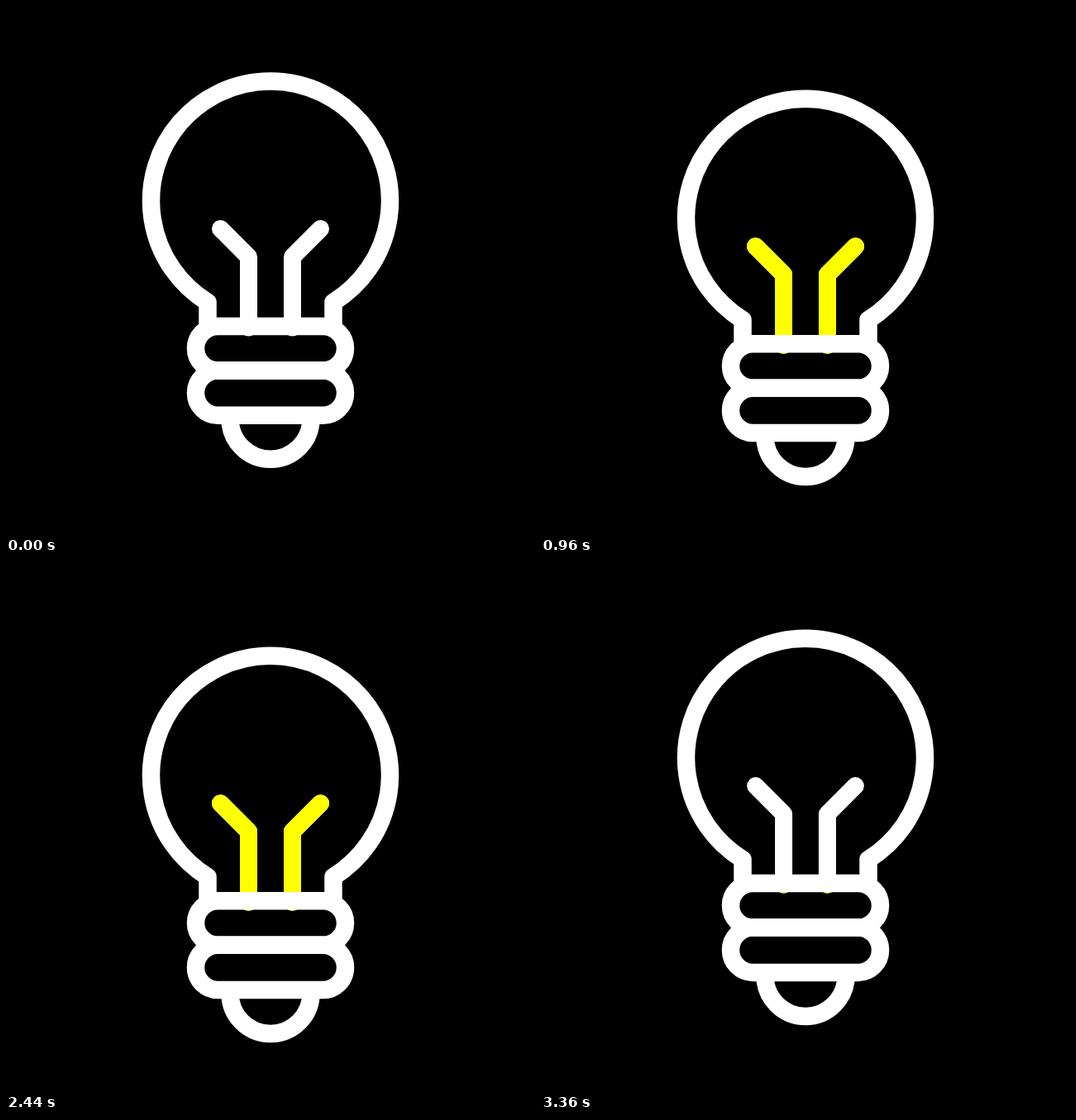
Recreate the animation shown at these times as an HTML page. Size 640 px wide and 640 px high, loop 3400 ms.

```html
<!DOCTYPE html>
<html lang="en">
<head>
<meta charset="utf-8">
<title>Light bulb</title>
<style>
  html, body { margin: 0; width: 100%; height: 100%; overflow: hidden; background: #000; }
  svg { display: block; width: 100%; height: 100%; }
  g { fill: none; stroke: #fff; stroke-linecap: round; stroke-linejoin: round; }
  #bulb { stroke-width: 21.5; }
  .wire { stroke-width: 21; }
  .ray { stroke-width: 20.5; }
  .lit { stroke: #ff0; }
</style>
</head>
<body>
<svg viewBox="0 0 640 640">
  <g id="bulb">
    <g id="wires" class="wire"></g>
    <g id="glow" class="wire lit"></g>
    <path d="M244 388V358.5A144.5 144.5 0 1 1 396 358.5V388"/>
    <rect x="229.5" y="387.5" width="181" height="53.5" rx="26.7"/>
    <rect x="229.5" y="441" width="181" height="54.3" rx="27"/>
    <path d="M271 497V499.3A49 49 0 0 0 369 499.3V497"/>
    <g id="rays" class="ray"></g>
    <g id="litRays" class="ray lit"></g>
  </g>
</svg>
<script>
const STEP = 40, COUNT = 85;
const el = id => document.getElementById(id);

// Eased value at time t from [time, value] keys.
function track(keys, t) {
  if (t <= keys[0][0]) return keys[0][1];
  for (let i = 1; i < keys.length; i++) {
    const [a, from] = keys[i - 1], [b, to] = keys[i];
    if (t <= b) {
      const u = (t - a) / (b - a);
      return from + (to - from) * u * u * (3 - 2 * u);
    }
  }
  return keys[keys.length - 1][1];
}

const BOB = [[30, 0], [280, 22], [650, 0], [920, 22], [1280, 0]];
const PINCH = [[30, 0], [320, 1], [640, 0]];
const GLOW = [[30, 0], [480, 1], [1200, 1], [1680, 0]];
const RAY_END = [[120, 0], [520, 1]];
const RAY_START = [[600, 0], [920, 1]];
const RAY_LIT = [[360, 0], [600, 1]];

// Inner point of each left ray and its direction outwards.
const RAYS = [[131, 152.3, -.907, -.42], [120.5, 212, -1, 0], [131, 271.7, -.907, .42]];
const RAY_LENGTH = 28.5;

const add = (parent, d) => {
  const p = document.createElementNS('http://www.w3.org/2000/svg', 'path');
  if (d) p.setAttribute('d', d);
  return parent.appendChild(p);
};
const mirror = (x, side) => side ? 640 - x : x;

const wires = [0, 1].map(side => ({ side, base: add(el('wires')), lit: add(el('glow')) }));
wires.forEach(w => w.lit.setAttribute('pathLength', 100));

const rays = [0, 1].flatMap(side => RAYS.map(ray => (
  { side, ray, base: add(el('rays')), lit: add(el('litRays')) })));

function segment(path, { side, ray: [x, y, dx, dy] }, from, to) {
  const at = k => `${mirror(x + dx * RAY_LENGTH * k, side)} ${y + dy * RAY_LENGTH * k}`;
  path.setAttribute('d', to > from ? `M${at(from)}L${at(to)}` : '');
}

function draw(t) {
  el('bulb').setAttribute('transform', `translate(0 ${track(BOB, t)})`);

  const pinch = track(PINCH, t), glow = track(GLOW, t);
  for (const w of wires) {
    const stem = mirror(293.5 + 21 * pinch, w.side);
    const tip = mirror(259.5 + 47 * pinch, w.side);
    const d = `M${stem} 389V303.5L${tip} 269.5`;
    w.base.setAttribute('d', d);
    w.lit.setAttribute('d', glow > 0 ? d : '');
    w.lit.setAttribute('stroke-dasharray', glow < 1 ? `${100 * glow} 300` : 'none');
  }

  const start = track(RAY_START, t), end = track(RAY_END, t), lit = track(RAY_LIT, t);
  for (const r of rays) {
    segment(r.base, r, start, lit < 1 ? end : 0);
    segment(r.lit, r, start, Math.min(lit, end));
  }
}

// The second half plays the first half backwards.
const begin = performance.now();
function tick() {
  const n = Math.floor((performance.now() - begin) / STEP) % COUNT;
  draw(Math.min(n, COUNT - n) * STEP);
  requestAnimationFrame(tick);
}
tick();
</script>
</body>
</html>
```
